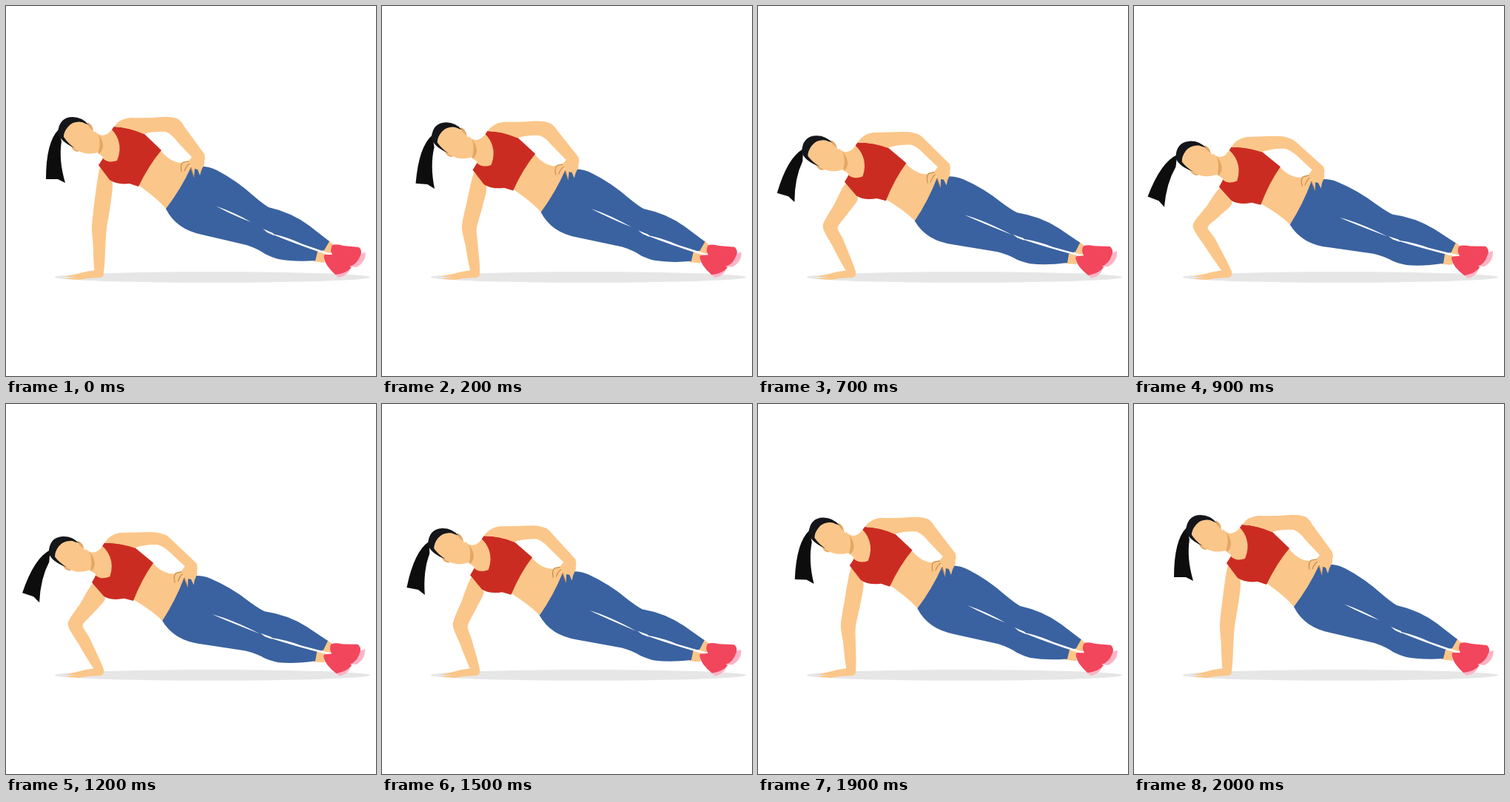
Recreate the animation shown at these times as an HTML page. Size 500 by 500 pixels, loop 3000 ms.

```html
<!DOCTYPE html>
<html lang="en">
<head>
<meta charset="utf-8">
<title>Side plank</title>
<style>
  html, body { margin: 0; width: 100%; height: 100%; overflow: hidden; background: #fff; }
  svg { display: block; width: 100%; height: 100%; }
  .skin { fill: #fbc689; }
  .shade { fill: #e3a664; }
  .red { fill: #cb2c22; }
  .blue { fill: #3a62a0; }
  .hair { fill: #0d0d0e; }
  .cap { fill: #14161a; }
  .shoe { fill: #f2465c; }
  .sole { fill: #fbb4c6; }
  .gap { fill: #fff; }
  .line { fill: none; stroke: #c98d4c; stroke-width: 1.2; }
</style>
</head>
<body>
<svg viewBox="0 0 500 500">
  <ellipse cx="279" cy="366.5" rx="213" ry="7.3" fill="#e6e6e6"/>
  <path class="skin" d="M79 366 L100 361 L108 359 L121 357 L132 358 Q133 366 128 367 L110 368 L99 370 L80 368.5 L95 366Z"/>
  <path class="skin" id="arm"/>

  <g id="body">
    <!-- ankles and shoes -->
    <path class="skin" d="M435 316 L442 322 L439 335 L428 331Z M419 331 L432 335 L430 347 L415 345Z"/>
    <path class="sole" d="M479 335 L486 333 Q486 347 473 353 L466 352 Q463 365 449 367 L445 363 L466 348Z"/>
    <path class="shoe" d="M441 323 Q447 321 456 324 L477 326 Q482 331 479 337 Q474 350 464 352 L467 353 Q461 361 445 363 Q431 350 430 341 Q428 335 435 336 L441 336 Q437 330 441 323Z"/>

    <!-- waist and trousers -->
    <path class="skin" d="M176 240 Q205 260 217 275 L254 219 L238 212 Q222 212 208 194Z"/>
    <path class="blue" d="M250 218 Q270 214 285 222 Q312 236 335 257 Q348 268 355 272 Q386 279 410 297 L437 318 L430 330 L421 332 L418 344 Q390 346 368 342 Q360 340 350 335 Q340 328 325 323 L265 309 Q230 302 216 274 Q236 248 250 218Z"/>
    <path class="gap" id="thighGap"/>
    <path class="gap" d="M347 301 L361 307 L362 310 L353 306Z M361 308 Q382 313 400 321.5 L429 331.5 L441 335 L428 334 Q390 321 361 309Z"/>

    <!-- chest and top -->
    <path class="skin" d="M120 169 Q133 183 146 163 L158 185 L152 214 L128 214 L131 204 L122 197Z"/>
    <path class="red" d="M146 163 Q167 164 186 172 L210 195 Q193 215 179 244 L167 240 Q150 242 140 235 L125 215 L131 206 Q138 213 150 209 Q156 195 152 182 Q149 173 143 167Z"/>

    <!-- head -->
    <path class="shade" d="M125 174 Q131 181 131 190 Q130 197 125 200Z"/>
    <path class="shade" d="M110 157 Q117 160 118 169 L112 166Z M88 190 Q91 197 98 197 L96 190Z"/>
    <path class="skin" d="M78 178 Q79 163 92 156 L106 157 L126 177 Q128 190 124 198 Q112 201 103 198 Q84 191 78 178Z"/>
    <path class="hair" id="tail" d="M71 167 Q54 184 54 234 L70 234 L80 239 Q71 208 75 183Z"/>
    <path class="cap" d="M93 192 Q73 183 70 171 Q72 150 90 150 Q103 150 112 161 L103 157 Q91 155 84 163 Q78 170 78 177 Q84 186 93 192Z"/>

    <!-- arm on the hip -->
    <path class="skin" id="hipArm"/>
    <path class="skin" d="M253 202 L268 200 L268 214 L264 222 L262 229 L259 221 L255 220 L254 231 L249 215 Q247 221 243 225 L237 224 Q235 214 238 211 L247 209Z"/>
    <path class="line" d="M237 224 Q235 213 240 211 L247 210 M241 223 Q243 217 248 213 M250 218 L254 231"/>
  </g>
</svg>
<script>
  const STEP = 100, STEPS = 30, BOTTOM = 10;
  const WRIST = [126, 359];
  const $ = id => document.getElementById(id);

  const mix = (a, b, k) => a.map((v, i) => v + (b[i] - v) * k);
  const offset = ([x, y], [dx, dy], k) => [x + dx * k, y + dy * k];

  // Unit vector at a right angle to the line from a to b.
  function normal(a, b) {
    const dx = b[0] - a[0], dy = b[1] - a[1], length = Math.hypot(dx, dy);
    return [-dy / length, dx / length];
  }

  // Closed curve through all points with gentle rounding.
  function smooth(pts, tension = 0.11) {
    const at = i => pts[(i + pts.length) % pts.length];
    const handle = (i, sign) => [0, 1].map(
      c => at(i)[c] + sign * tension * (at(i + 1)[c] - at(i - 1)[c]));
    return 'M' + pts[0] + pts.map((_, i) =>
      `C${handle(i, 1)} ${handle(i + 1, -1)} ${at(i + 1)}`).join('') + 'Z';
  }

  // The shoulder sinks and the elbow swings out over a planted wrist.
  function supportArm(depth) {
    const shoulder = [135.5 - 12 * depth, 228 + 31 * depth];
    const elbow = [126 - 40.5 * depth, 300 - 2.5 * depth];
    const upper = normal(shoulder, elbow), lower = normal(elbow, WRIST);
    const side = s => [
      offset(shoulder, [-8, -10], s),
      offset(mix(shoulder, elbow, 0.5), upper, 11 * s),
      offset(elbow, [-10, -1], s),
      offset(mix(elbow, WRIST, 0.35), lower, 8.5 * s),
      offset(WRIST, [-6, 0], s)
    ];
    return smooth([...side(1), ...side(-1).reverse()]);
  }

  // The elbow on the hip bends further as the body sinks.
  function bentArm(depth) {
    const e = depth / 0.8;
    return `M146 163 Q154 152 168 151 Q190 152 ${210 - e} ${150 + 3 * e}
      Q${224 - 3 * e} ${149 + 5 * e} ${233 - 3 * e} ${153 + 6 * e}
      Q${238 - 3 * e} ${157 + 6 * e} ${241 - 2 * e} ${163 + 5 * e}
      L268 200 L269 206 L266 216 L${250 + 3 * e} ${203 + e}
      L${232 + 2 * e} ${184 - e} Q${224 + 2 * e} ${173 + e} ${216 + 2 * e} ${170 + e}
      Q200 169 186 173 Q166 164 146 163Z`;
  }

  function draw(depth) {
    const gapEnd = mix([331, 292], [346, 301.5], Math.min(1, depth / 0.4));
    $('body').setAttribute('transform',
      `translate(0 ${2 * depth}) rotate(${-5.5 * depth} 440 345)`);
    $('tail').setAttribute('transform', `rotate(${28.9 * depth} 72 170)`);
    $('arm').setAttribute('d', supportArm(depth));
    $('hipArm').setAttribute('d', bentArm(depth));
    $('thighGap').setAttribute('d', `M284 270.5 Q310 279.5 ${gapEnd} Q308 283.5 284 270.5Z`);
  }

  let shown = -1;
  function tick() {
    const step = Math.floor(performance.now() / STEP) % STEPS;
    if (step !== shown) {
      shown = step;
      draw(Math.max(0, 1 - Math.abs(step - BOTTOM) / BOTTOM));
    }
    requestAnimationFrame(tick);
  }
  tick();
</script>
</body>
</html>
```
